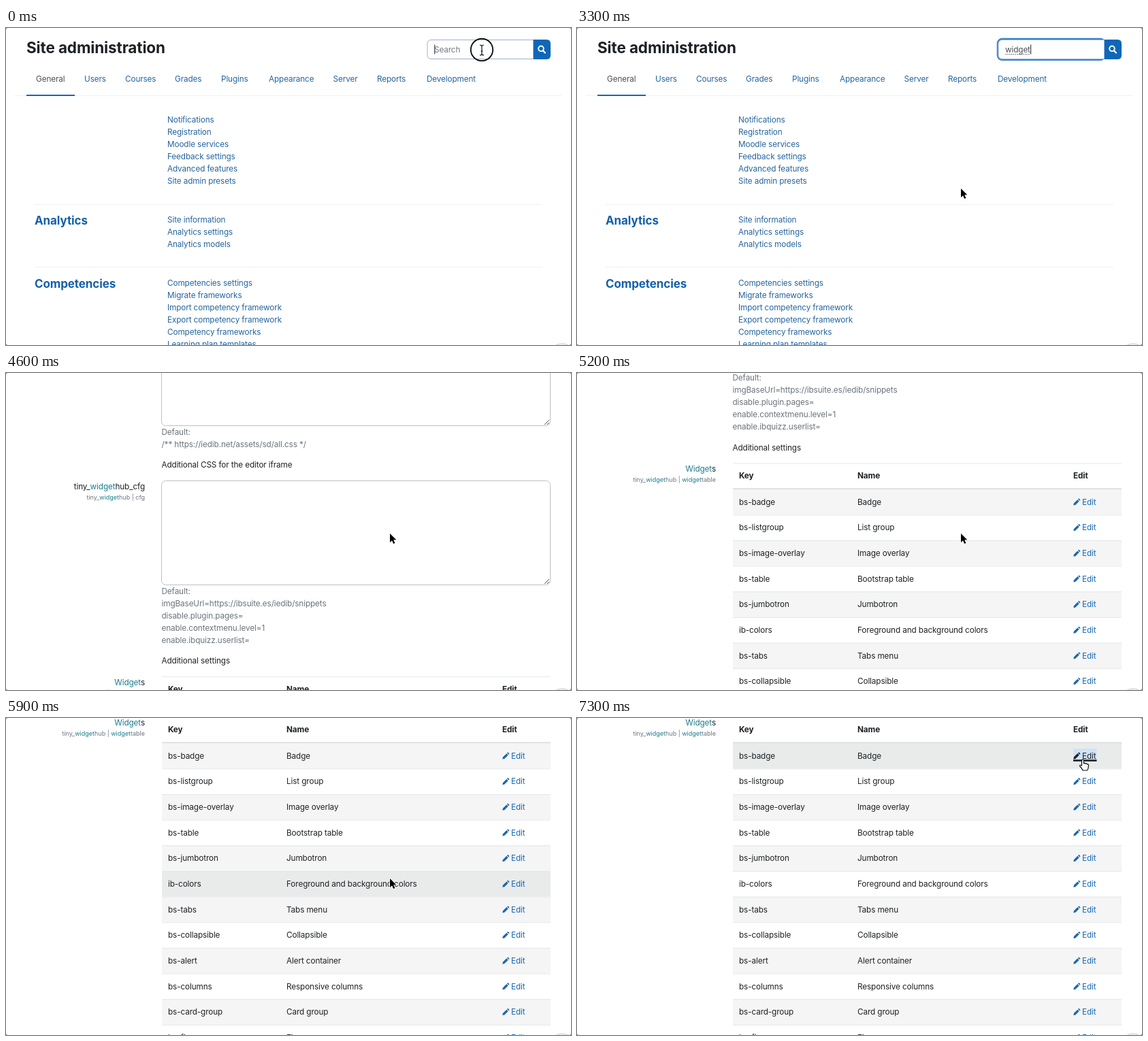
Write an HTML page that moves like this. It is 830 px wide and 466 px high and loops after 8 s.

```html
<!DOCTYPE html>
<html lang="en">
<head>
<meta charset="utf-8">
<title>Site administration</title>
<style>
html, body { margin: 0; width: 830px; height: 466px; overflow: hidden; background: #777; }
svg { display: block; background: #fff; border-radius: 3px; }
text { font-family: Inter, "Open Sans", sans-serif; font-optical-sizing: none; letter-spacing: -.01em; white-space: pre; }
.small { letter-spacing: 0; }
.title { letter-spacing: -.006em; font-weight: 700; }
</style>
</head>
<body>
<svg id="stage" width="830" height="466" viewBox="0 0 830 466"></svg>
<script>
const INK = '#1d2125', GRAY = '#6a737b', LINK = '#24649f', BLUE = '#1766b0', TEAL = '#1b7c8e';
const ROW = 37.65, ROW_TOP = 880.2;

// y is the middle of the capital letters
const text = (x, y, s, fill = INK, size = 11.75, attrs = '') =>
  `<text x="${x}" y="${y + size * .364}" font-size="${size}" fill="${fill}" ${attrs}>${s}</text>`;
const rect = (x, y, w, h, fill, attrs = '') =>
  `<rect x="${x}" y="${y}" width="${w}" height="${h}" fill="${fill}" ${attrs}/>`;
const bold = 'font-weight="700"', right = 'text-anchor="end"', small = 'class="small"', title = 'class="title"';
const mark = s => s.replace(/widget/gi, `<tspan fill="${TEAL}">$&</tspan>`);
const lines = (x, y, list, fill) => list.map((s, i) => text(x, y + .3 + i * 18, s, fill)).join('');

const header = text(30, 29, 'Site administration', INK, 22.5, title);

const tabNames = ['General', 'Users', 'Courses', 'Grades', 'Plugins', 'Appearance', 'Server', 'Reports', 'Development'];
const tabs = (xs, activeWidth) =>
  tabNames.map((s, i) => text(xs[i], 75, s, i ? LINK : '#495057')).join('') +
  rect(30, 98, activeWidth, 2, BLUE);
const navLine = rect(13, 99, 804, 1, '#f0f1f2');

const section = (y, name, list) =>
  text(42, y + 2.3, name, '#1460a9', 17, title) + lines(237, y, list, LINK);

const adminPage = header + navLine +
  tabs([44, 115, 175, 248, 316, 386, 480.5, 545, 618], 71) +
  section(134.5, '', ['Notifications', 'Registration', 'Moodle services', 'Feedback settings',
    'Advanced features', 'Site admin presets']) +
  rect(42, 259, 746, 1, '#f0f1f2') +
  section(281, 'Analytics', ['Site information', 'Analytics settings', 'Analytics models']) +
  rect(42, 351, 746, 1, '#f0f1f2') +
  section(374, 'Competencies', ['Competencies settings', 'Migrate frameworks', 'Import competency framework',
    'Export competency framework', 'Competency frameworks', 'Learning plan templates']);

const label = (y, name, key) =>
  text(204, y, mark(name), INK, 11.75, right) +
  text(204, y + 16, mark('tiny_widgethub | ' + key), GRAY, 9, right + ' ' + small);
const textarea = y =>
  rect(228.5, y + .5, 571, 153, '#fff', 'rx="6" stroke="#bcc1c6"') +
  `<path d="M791 ${y + 152}l7-7M795 ${y + 152}l3-3" stroke="#555" fill="none"/>`;

const crumbs = [[30, 'Administration'], [111, 'Plugins'], [159, 'Text editors'], [228, 'TinyMCE editor'],
  [313, 'WidgetHub'], [379.5, 'WidgetHub']];
const slashes = [101, 150, 218.5, 303.5, 369.5];

const rows = [['bs-badge', 'Badge'], ['bs-listgroup', 'List group'], ['bs-image-overlay', 'Image overlay'],
  ['bs-table', 'Bootstrap table'], ['bs-jumbotron', 'Jumbotron'], ['ib-colors', 'Foreground and background colors'],
  ['bs-tabs', 'Tabs menu'], ['bs-collapsible', 'Collapsible'], ['bs-alert', 'Alert container'],
  ['bs-columns', 'Responsive columns'], ['bs-card-group', 'Card group'], ['bs-figure', 'Figure']];

const editLink = (y, color) =>
  `<path transform="translate(729.3 ${y - 5})" fill="${color}" d="M0 10L.6 7 6 1.6 8.4 4 3 9.4ZM6.7.9L7.4.2Q8-.3 8.6.2L9.8 1.4Q10.3 2 9.8 2.6L9.1 3.3Z"/>` +
  text(742, y, 'Edit', color);

const tableRow = ([key, name], i) => {
  const y = ROW_TOP + i * ROW, mid = y + ROW / 2;
  return rect(229, y, 571, ROW, i % 2 ? '#fff' : '#f5f5f5', 'class="row"') +
    (i ? rect(229, y, 571, 1, '#e3e6e8') : '') +
    text(238, mid, key) + text(412, mid, name) + editLink(mid, '#1a68b3');
};

const focusedEdit = rect(729, 888.5, 34.5, 16.5, '#cfe3f7') + rect(729, 904.7, 34.5, 2.6, INK) + editLink(899, INK);

const resultsPage = header + navLine +
  `<g id="tabs">${tabs([43, 111, 168, 238.5, 304, 369, 460.5, 522, 590], 68)}</g>` +
  rect(30, 125, 770, 1, '#f0f1f2') +
  text(30, 154, 'Search results', INK, 22.5, title) +
  text(30, 196, mark('WidgetHub'), '#1460a9', 15, bold) +
  crumbs.map(([x, s]) => text(x, 226, s, GRAY, 9.4, small)).join('') +
  slashes.map(x => text(x, 226, '/', GRAY, 9.4, small)).join('') +
  label(262, 'tiny_widgethub_sharecss', 'sharecss') +
  rect(228.5, 260, 10.5, 10.5, '#0b66c8', 'rx="2"') +
  '<path d="M231 265.4l2.2 2.4 3.6-5" stroke="#fff" stroke-width="1.5" fill="none"/>' +
  text(242, 266, 'Default: Yes', GRAY) +
  text(228.5, 297, "Share the site CSS within the editor's iframe") +
  label(328.5, 'tiny_widgethub_additionalcss', 'additionalcss') +
  textarea(320) +
  lines(228.5, 482.5, ['Default:', '/** https://iedib.net/assets/sd/all.css */'], GRAY) +
  text(228.5, 531, 'Additional CSS for the editor iframe') +
  label(562.5, 'tiny_widgethub_cfg', 'cfg') +
  textarea(554) +
  lines(228.5, 716.2, ['Default:', 'imgBaseUrl=https://ibsuite.es/iedib/snippets', 'disable.plugin.pages=',
    'enable.contextmenu.level=1', 'enable.ibquizz.userlist='], GRAY) +
  text(228.5, 819, 'Additional settings') +
  label(850.5, 'Widgets', 'widgettable') +
  rect(229, 842, 571, 1, '#e6e8ea') +
  text(238, 860.5, 'Key', INK, 11.75, bold) + text(412, 860.5, 'Name', INK, 11.75, bold) +
  text(729, 860.5, 'Edit', INK, 11.75, bold) +
  rows.map(tableRow).join('') +
  rect(229, 878.9, 571, 1.6, '#d9dcdf') +
  `<g id="focus">${focusedEdit}</g>`;

const searchBox =
  rect(618.2, 16.2, 157, 30.4, 'none', 'id="ring" rx="6.5" stroke="#3d84c6" stroke-width="3"') +
  '<path d="M774 17H794Q800 17 800 23V40Q800 46 794 46H774Z" fill="#0f67b8"/>' +
  '<circle cx="786" cy="30.3" r="3.8" fill="none" stroke="#fff" stroke-width="1.9"/>' +
  '<path d="M788.8 33.2l3.2 3.3" stroke="#fff" stroke-width="2.2" stroke-linecap="round"/>' +
  '<path id="field" d="M774.5 17.5H625Q619 17.5 619 23.5V39.5Q619 45.5 625 45.5H774.5Z" fill="#fff"/>' +
  text(629, 32, '', '#495057', 11.75, 'id="value"') +
  '<path id="spell" d="M629.5 38.7H666" stroke="#555" stroke-width="1.3" stroke-dasharray="1.3 1.5"/>' +
  rect(0, 24.5, 1, 14, '#222', 'id="caret"');

const pointer =
  `<g id="pointer" stroke-linejoin="round">
    <circle id="click" r="16.2" fill="none" stroke="#111" stroke-width="1.9"/>
    <path id="beam" d="M-3-7Q0-7 0-5Q0-7 3-7M0-5V6M-3 8Q0 8 0 6Q0 8 3 8M-1.5 2H1.5" fill="none" stroke="#111" stroke-width="1.2"/>
    <path id="arrow" d="M0 0V13L3 10.2 5.2 15 7.4 14 5.3 9.3H9.3Z" fill="#000" stroke="#fff" stroke-width="1.6" paint-order="stroke"/>
    <path id="hand" d="M-1.5 1.2Q0-1.2 1.5 1.2V6Q3 4.8 4 6.2 5.5 5.4 6.4 7 8.5 6.6 8.5 9 8.5 13 6.5 16H0Q-1 13-4.5 9.5-4.5 7.3-1.5 9Z" fill="#fff" stroke="#111" stroke-width="1.2"/>
  </g>`;

const helpButton = '<circle cx="817" cy="484" r="20" fill="#f3f4f5" stroke="#c9cdd0"/>';

const stage = document.getElementById('stage');
stage.innerHTML = `<g id="admin">${adminPage}</g><g id="results">${resultsPage}</g>` +
  `<g id="search">${searchBox}</g>${helpButton}${pointer}`;
const el = id => document.getElementById(id);
const show = (id, on) => el(id).setAttribute('visibility', on ? 'inherit' : 'hidden');
const move = (id, x, y) => el(id).setAttribute('transform', `translate(${x} ${y})`);
const rowRects = [...stage.querySelectorAll('.row')];

// Linear interpolation through [time, ...values]
function along(keys, t) {
  const n = keys.findIndex(k => k[0] > t);
  if (n === 0) return keys[0].slice(1);
  if (n < 0) return keys[keys.length - 1].slice(1);
  const a = keys[n - 1], b = keys[n], p = (t - a[0]) / (b[0] - a[0]);
  return a.slice(1).map((v, i) => v + (b[i + 1] - v) * p);
}

const scrollPath = [[3900, 0], [4000, 25], [4100, 71], [4200, 130], [4400, 258], [4600, 396], [4800, 524],
  [5000, 630], [5200, 709.5], [5300, 742], [5400, 770], [5500, 795], [5600, 815.5], [5700, 829], [5800, 838], [5900, 843.5]];
const mousePath = [[2600, 699, 32], [2800, 680, 62], [3100, 590, 205], [3300, 564, 236], [6300, 564, 236],
  [6400, 603, 203], [6500, 668, 142], [6600, 699, 116], [6700, 699, 116], [6900, 722, 88], [7200, 743, 61]];
const typing = [[600, 'wi'], [700, 'wid'], [900, 'widg'], [1100, 'widge'], [1200, 'widget']];
const caretPath = [[0, 1], [1400, 1], [1700, 0], [1800, 0], [2000, 1], [2200, 1], [2400, 0], [2600, 0], [2800, 1], [3500, 1]];

function hoveredRow(t, mouseY, scroll) {
  if (t < 5300) return -1;
  if (t < 5900) return 2;
  return Math.floor((mouseY + scroll - ROW_TOP) / ROW);
}

function draw(t) {
  const loaded = t >= 3500, typed = typing.filter(k => k[0] <= t).pop();
  const [scroll] = along(scrollPath, t), [mx, my] = along(mousePath, t);

  show('admin', !loaded);
  show('results', loaded);
  show('tabs', t >= 3800);
  show('focus', t >= 7300);
  move('results', 0, -scroll);
  move('search', 0, -scroll);

  const value = el('value');
  value.textContent = typed ? typed[1] : 'Search';
  value.setAttribute('fill', typed ? '#495057' : '#737b82');
  el('caret').setAttribute('x', 629.3 + (typed ? value.getComputedTextLength() : 0));
  el('caret').setAttribute('opacity', loaded ? 0 : along(caretPath, t)[0]);
  el('ring').setAttribute('opacity', loaded ? 0 : Math.min(1, t / 300));
  el('field').setAttribute('stroke', loaded ? '#9aa1a8' : t < 100 ? '#9fb3c8' : '#8fb5da');
  show('spell', t >= 1200 && !loaded);

  const hover = hoveredRow(t, my, scroll);
  rowRects.forEach((r, i) => r.setAttribute('fill', i === hover ? '#e9ebeb' : i % 2 ? '#fff' : '#f5f5f5'));

  move('pointer', mx, my);
  show('click', t < 300);
  el('click').setAttribute('opacity', 1 - t / 300);
  show('beam', t < 600);
  show('arrow', t >= 2700 && t < 7200);
  show('hand', t >= 7200);
}

const start = performance.now();
function tick() {
  draw(Math.floor((performance.now() - start) % 8000 / 100) * 100);
  requestAnimationFrame(tick);
}
tick();
</script>
</body>
</html>
```
